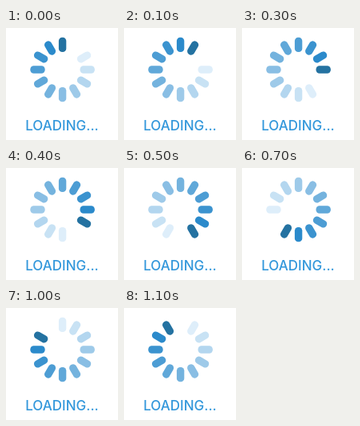
Write an HTML page that moves like this. It is 140 px wide and 140 px high and loops after 1200 ms.

```html
<!DOCTYPE html>
<html lang="en">
<head>
<meta charset="utf-8">
<title>Loading</title>
<style>
  html, body { margin: 0; width: 100%; height: 100%; overflow: hidden; background: #fff; }
  svg { display: block; width: 100vw; height: 100vh; }
  text { font: 500 17px Inter, sans-serif; fill: #3498db; }
</style>
</head>
<body>
<svg viewBox="0 0 140 140">
  <g id="spinner" transform="translate(70.6 52)"></g>
  <text x="24.2" y="128">LOADING...</text>
</svg>
<script>
  const COUNT = 12, STEP = 100;
  const spinner = document.getElementById('spinner');

  const mix = (from, to, t) =>
    `rgb(${from.map((v, i) => Math.round(v + (to[i] - v) * t))})`;

  // Dark head, a tail fading to pale blue, and a gap ahead of the head
  function barColor(age) {
    if (age === 0) return '#2472a1';
    if (age === COUNT - 1) return 'none';
    return mix([43, 138, 203], [222, 238, 250], ((age - 1) / 9) ** 1.1);
  }

  const bars = Array.from({ length: COUNT }, (_, i) => {
    const bar = document.createElementNS('http://www.w3.org/2000/svg', 'rect');
    const box = { x: -4.7, y: -40.3, width: 9.4, height: 18.4, rx: 4.4 };
    for (const name in box) bar.setAttribute(name, box[name]);
    bar.setAttribute('transform', `rotate(${i * 360 / COUNT})`);
    return spinner.appendChild(bar);
  });

  function draw(now) {
    const head = Math.floor(now / STEP) % COUNT;
    bars.forEach((bar, i) =>
      bar.setAttribute('fill', barColor((head - i + COUNT) % COUNT)));
  }

  const start = performance.now();
  function tick() {
    draw(performance.now() - start);
    requestAnimationFrame(tick);
  }
  tick();
</script>
</body>
</html>
```
